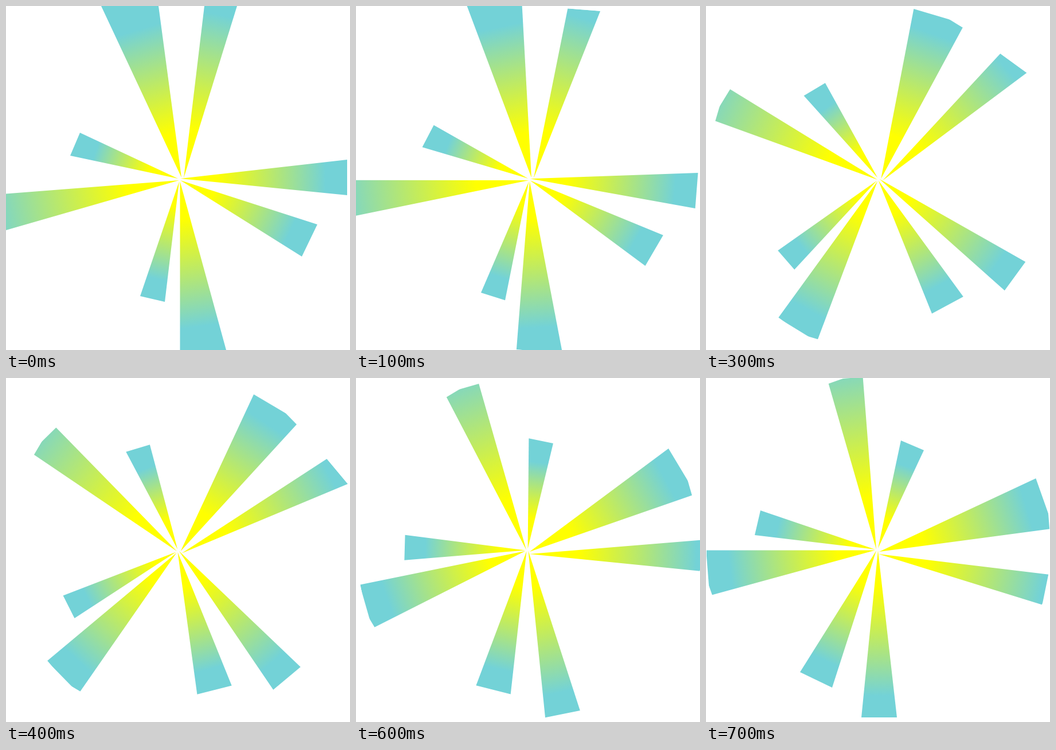
These frames come from a looping animation (600 by 600 pixels, 0.8 s). An HTML page with a canvas:

```html
<!DOCTYPE html>
<html lang="en">
<head>
<meta charset="utf-8">
<title>Turning rays</title>
<style>
  html, body { margin: 0; height: 100%; overflow: hidden; background: #fff; }
  canvas { display: block; }
</style>
</head>
<body>
<canvas id="stage" width="600" height="600"></canvas>
<script>
const ctx = document.getElementById('stage').getContext('2d');
const SIZE = 600, STEP = 100;
const CX = 302, CY = 299;
const angles = [0, 4.5, 19.5, 36, 50.1, 65, 78.5, 90];

// tip x, y, two outer corners, where the blend begins and ends along the ray
const rays = [
  [306, 299, 166, 0, 266, 0, .25, .86],
  [310, 300, 346, 0, 403, 0, .28, .95],
  [304, 301, 595, 268, 595, 330, .22, .87],
  [304, 304, 543, 381, 516, 437, .25, .85],
  [303.5, 306, 384, 600, 303.5, 600, .22, .86],
  [302, 306, 277, 516, 234, 506, .21, .83],
  [302, 304, 0, 391, 0, 327.5, .3, 1.1],
  [300, 301, 112, 261, 129, 221, .28, .8]
];

function turn(degrees) {
  ctx.setTransform(1, 0, 0, 1, CX, CY);
  ctx.rotate(degrees * Math.PI / 180);
  ctx.translate(-CX, -CY);
}

function drawRay([x, y, ax, ay, bx, by, from, to]) {
  const dx = (ax + bx) / 2 - x, dy = (ay + by) / 2 - y;
  const fill = ctx.createLinearGradient(
    x + dx * from, y + dy * from, x + dx * to, y + dy * to);
  fill.addColorStop(0, '#ffff00');
  fill.addColorStop(1, '#73d2d7');
  ctx.fillStyle = fill;
  ctx.beginPath();
  ctx.moveTo(x, y);
  ctx.lineTo(ax, ay);
  ctx.lineTo(bx, by);
  ctx.fill();
}

function draw(pose) {
  ctx.resetTransform();
  ctx.clearRect(0, 0, SIZE, SIZE);
  ctx.save();
  // Each earlier pose has already trimmed the rays at the stage edges.
  for (let i = 0; i <= pose; i++) {
    turn(angles[pose] - angles[i]);
    ctx.beginPath();
    ctx.rect(0, 0, SIZE, SIZE);
    ctx.clip();
  }
  turn(angles[pose]);
  rays.forEach(drawRay);
  ctx.restore();
}

const start = performance.now();
function tick() {
  const steps = Math.floor((performance.now() - start) / STEP);
  draw(steps % angles.length);
  requestAnimationFrame(tick);
}
tick();
</script>
</body>
</html>
```
